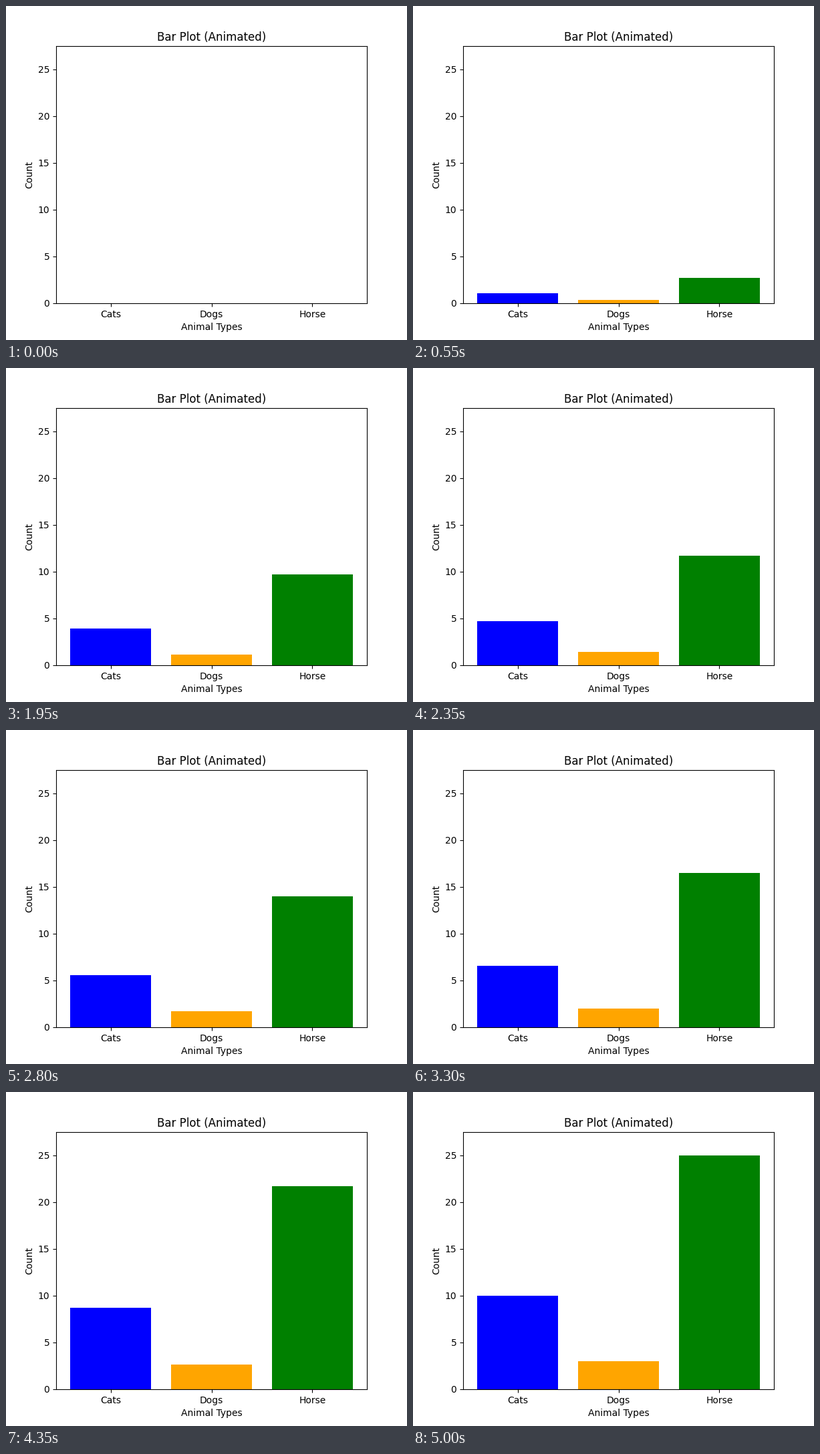
These frames come from a looping animation (600 px wide and 500 px high, 5050 ms). A matplotlib script:

```python
import matplotlib.pyplot as plt
from matplotlib.animation import FuncAnimation

ANIMALS = ["Cats", "Dogs", "Horse"]
COUNTS = [10, 3, 25]
COLORS = ["blue", "orange", "green"]
STEPS = 100
INTERVAL = 50  # ms

plt.rcParams["font.family"] = "DejaVu Sans"

fig, ax = plt.subplots(figsize=(6, 5), dpi=100)
bars = ax.bar(ANIMALS, [0] * len(ANIMALS), color=COLORS)
ax.set_xlim(-0.54, 2.54)
ax.set_ylim(0, 1.1 * max(COUNTS))
ax.set_title("Bar Plot (Animated)")
ax.set_xlabel("Animal Types")
ax.set_ylabel("Count")


def update(step):
    """Grow every bar linearly towards its final count."""
    for bar, count in zip(bars, COUNTS):
        bar.set_height(count * step / STEPS)
    return list(bars)


def reset():
    return update(0)


anim = FuncAnimation(fig, update, frames=STEPS + 1, init_func=reset,
                     interval=INTERVAL, repeat=True, repeat_delay=0,
                     blit=False)

plt.show()
```
